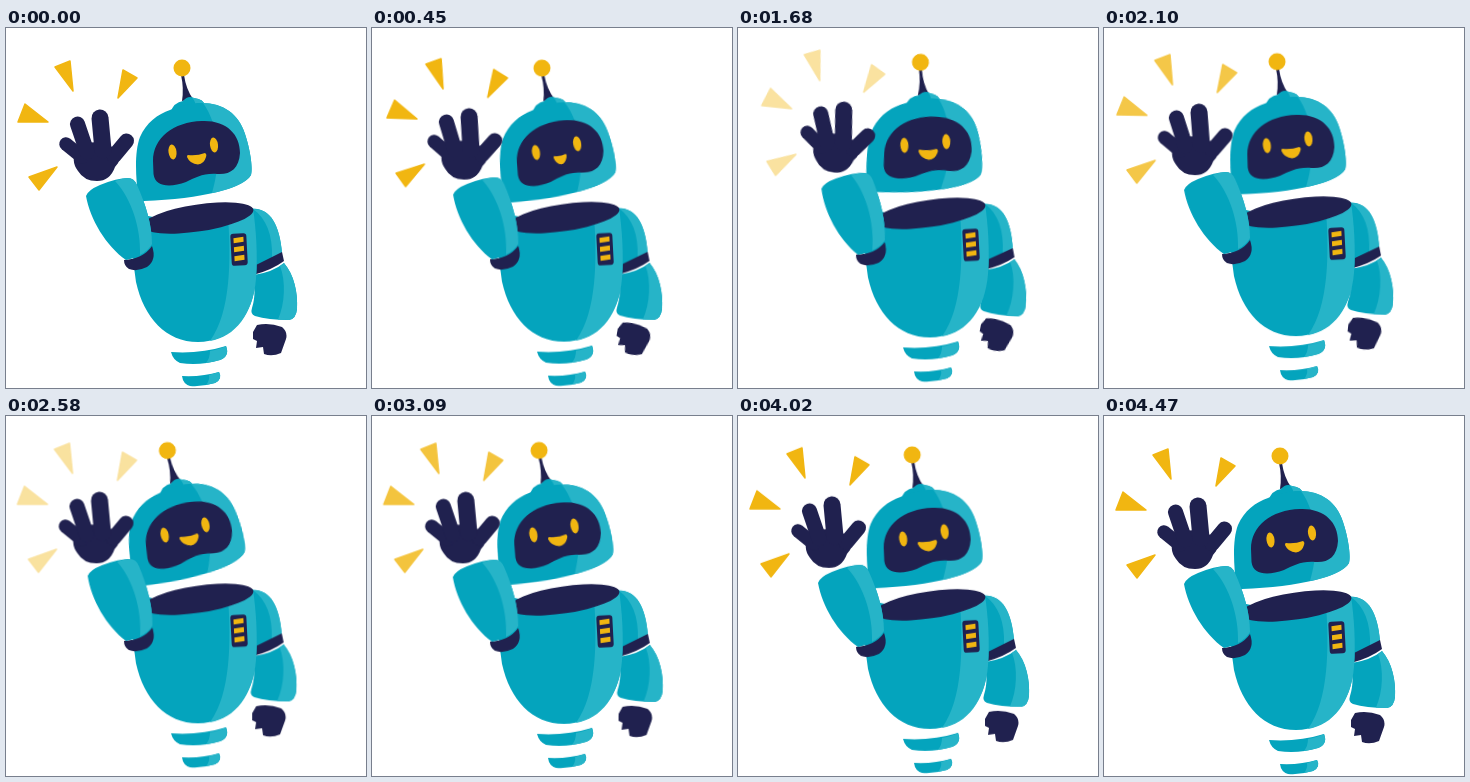
An HTML page that plays this animation: 360x360 px, repeating every 4.5 s.

```html
<!DOCTYPE html>
<html lang="en">
<head>
<meta charset="utf-8">
<title>Waving robot</title>
<style>
html, body { margin: 0; width: 100%; height: 100%; overflow: hidden; background: #fff; }
svg { display: block; width: 100%; height: 100%; }
.teal { fill: #04a4bd; }
.light { fill: #26b4c8; }
.dark { fill: #20214f; }
.gold { fill: #f1b611; }
.finger { fill: none; stroke: #20214f; stroke-linecap: round; }
.rays { stroke: #f1b611; stroke-width: 1.5; stroke-linejoin: round; }

.bot, .head, .mouth, .arm, .hand, .rays, .limb, .fist {
  animation: 4500ms ease-in-out infinite;
}
.bot { animation-name: bob; animation-timing-function: cubic-bezier(.37, 0, .63, 1); }
.head { animation-name: tilt; transform-origin: 188px 160px; }
.mouth { animation-name: smile; transform-origin: 190px 131px; }
.arm { animation-name: swing; transform-origin: 133px 232px; }
.hand { animation-name: wave; transform-origin: 90px 150px; }
.rays { animation-name: flash; animation-timing-function: linear; }
.limb { animation-name: sway; transform-origin: 255px 190px; }
.fist { animation-name: curl; transform-origin: 264px 302px; }

@keyframes bob {
  0%, 100% { transform: none; }
  61% { transform: translateY(-6.8px); }
}
@keyframes tilt {
  0%, 100% { transform: none; }
  10% { transform: translate(-1px, 0) rotate(-2.4deg); }
  24.67% { transform: translate(-3px, 0) rotate(4.2deg); }
  37.33% { transform: translate(-3px, -.5px) rotate(4.5deg); }
  57.33% { transform: translate(-5px, 0) rotate(-4.6deg); }
  80% { transform: translate(-2px, 0) rotate(-.6deg); }
}
@keyframes smile {
  0%, 18%, 100% { transform: none; }
  10% { transform: translateY(1px) scale(.68, .9); }
}
@keyframes swing {
  0%, 80%, 100% { transform: none; }
  10% { transform: rotate(1deg); }
  17.8% { transform: rotate(4deg); }
  24.67% { transform: rotate(-3.4deg); }
  28% { transform: rotate(-4deg); }
  34.7% { transform: rotate(4deg); }
  37.33% { transform: rotate(3deg); }
  45% { transform: none; }
  57.33% { transform: rotate(1.5deg); }
}
@keyframes wave {
  0%, 80%, 100% { transform: none; }
  10% { transform: translate(1px, -1px) rotate(2deg); }
  17.8% { transform: translate(8px, -7px) rotate(10deg); }
  24.67% { transform: rotate(6deg); }
  29.5% { transform: translate(-1px, 0) rotate(-2deg); }
  34.7% { transform: translate(7px, -6px) rotate(8deg); }
  37.33% { transform: translate(5.5px, -4px) rotate(6deg); }
  45% { transform: rotate(1deg); }
  57.33% { transform: translate(-.5px, 1px); }
}
@keyframes flash {
  0%, 13%, 74%, 100% { opacity: 1; }
  23%, 26% { opacity: 0; }
  37.33% { opacity: .4; }
  47.33% { opacity: .8; }
  57.33% { opacity: .4; }
}
@keyframes sway {
  0%, 80%, 100% { transform: none; }
  10% { transform: rotate(.6deg); }
  24.67% { transform: rotate(2.2deg); }
  37.33% { transform: rotate(2deg); }
  57.33% { transform: rotate(.4deg); }
}
@keyframes curl {
  0%, 57.33%, 100% { transform: none; }
  10%, 37.33% { transform: rotate(9deg); }
  24.67% { transform: rotate(12deg); }
}
</style>
</head>
<body>
<svg viewBox="0 0 360 360">
  <g class="bot">
    <g class="limb">
      <path class="teal" d="M240 181C262 177 273 193 276 225L244 242Z"/>
      <path class="light" d="M247 181C264 180 274 197 276 225L266 230C267 207 260 190 247 181Z"/>
      <path class="dark" d="M246 239L276 224L278 233Q266 242 247 247Z"/>
      <path class="teal" d="M248 247Q267 244 278 235C288 247 292 264 291 281Q290 291 283 292Q262 292 249 288Q244 286 246 280C250 267 248 258 248 247Z"/>
      <path class="light" d="M274 238L278 235C288 247 292 264 291 281Q290 291 283 292L272 291.500C279 276 280 253 274 238Z"/>
      <path class="dark fist" d="M251 297Q263 294 276 299Q282 304 280 311L275 325Q266 329 258 326L257 319L250 320L251 313L247 311L247 304Z"/>
    </g>

    <path class="teal" d="M165 324Q194 326 220 318Q224 328 214 332Q194 338 174 335Q167 332 165 324Z"/>
    <path class="light" d="M204 323Q214 321 220 318Q224 328 214 332Q207 334 200 335Q204 330 204 323Z"/>
    <path class="teal" d="M176 348Q196 349 213 344Q217 351 209 355Q196 359 184 358Q177 356 176 348Z"/>
    <path class="light" d="M203 347L213 344Q217 351 209 355L200 357Q204 352 203 347Z"/>

    <path class="teal" d="M128 184Q190 204 247 180C250 201 252 226 250 251C247 289 224 314 192 314C160 314 138 290 130 254C126 227 125 203 128 184Z"/>
    <path class="light" d="M222 188L247 180C250 201 252 226 250 251C247 286 229 309 204 313C225 284 225 232 222 188Z"/>
    <ellipse class="dark" cx="192" cy="190" rx="56" ry="13.500" transform="rotate(-8.500 192 190)"/>
    <g transform="rotate(-3 233 221)">
      <rect class="dark" x="225" y="205.500" width="16" height="32" rx="3"/>
      <path class="gold" d="M228 210L238 209V214L228 215ZM228 219L238 218V223L228 224ZM228 228L238 227V232L228 233Z"/>
    </g>

    <g class="head">
      <path class="dark" d="M175 47L178 47Q180 61 187 71L176 73Q178 60 175 47Z"/>
      <circle class="gold" cx="176" cy="40" r="8.500"/>
      <path class="teal" d="M164 85Q168 74 177 73Q182 67 188 70Q198 71 199 78Z"/>
      <path class="light" d="M186 69.500L188 70Q198 71 199 78L190 80Q190 74 186 69.500Z"/>
      <path class="teal" d="M132 168C130 150 128 125 134 109C140 95 152 86 164 82C176 77 185 75 195 75C217 75 233 86 239 106C244 121 247 139 245 147C238 160 196 171 138 173Q132 173 132 168Z"/>
      <path class="light" d="M197 75C217 75 233 86 239 106C244 121 247 139 245 147C240 155 226 161 206 165C216 132 213 97 197 75Z"/>
      <path class="dark" d="M147 133C147 110 167 94 196 93C220 92 234 106 234 125C233 141 224 147 211 146C197 145 189 150 180 154C164 160 149 159 147.500 146Z"/>
      <ellipse class="gold" cx="166.500" cy="124" rx="4" ry="7.500" transform="rotate(-8 166.500 124)"/>
      <ellipse class="gold" cx="208" cy="117" rx="4" ry="7.500" transform="rotate(-8 208 117)"/>
      <path class="gold mouth" d="M182 127Q191 128 199 125Q201 126 200 129Q198 136 192 136.500Q184 136 181 129Q181 127 182 127Z"/>
    </g>

    <g class="arm">
      <path class="dark" d="M118 232Q137 231 146 218Q151 232 141 239Q131 244 123 241Q118 238 118 232Z"/>
      <path class="teal" d="M80 168Q82 162 94 157Q111 150 122 150Q128 150 131 157C140 177 146 197 146 216Q138 229 120 232C100 218 84 191 80 168Z"/>
      <path class="light" d="M109 153Q117 150 122 150Q128 150 131 157C140 177 146 197 146 216Q142 223 134 227C135 201 126 171 109 153Z"/>
    </g>

    <g class="hand">
      <path class="rays gold" d="M64 33L49 39L67 63ZM117 42L131 50L112 70ZM19 76L12 94L42 94ZM23 149L51 139L33 162Z"/>
      <path class="dark" d="M71 119Q92 108 111 122Q117 131 109 139Q104 153 91 153Q78 153 72 143Q64 133 71 119Z"/>
      <path class="finger" stroke-width="13.500" d="M60 116L76 129"/>
      <path class="finger" stroke-width="15" d="M120.500 113L108 128M71.500 96L81 124"/>
      <path class="finger" stroke-width="17" d="M94 90L97 122"/>
    </g>
  </g>
</svg>
</body>
</html>
```
